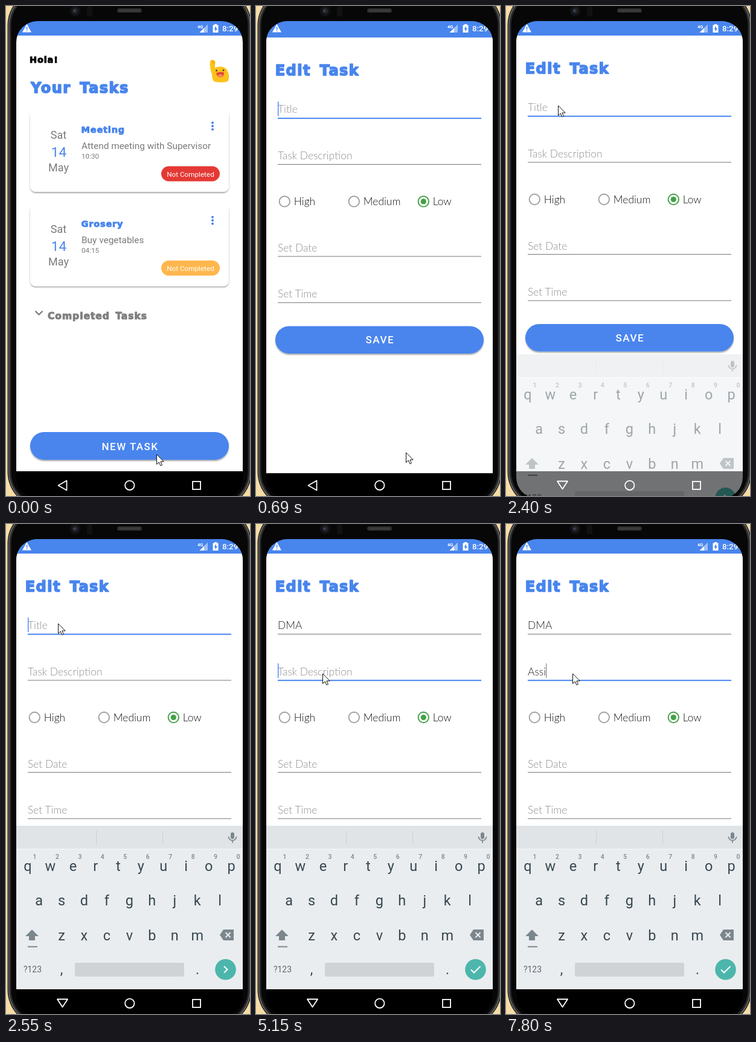
Write an HTML page that moves like this. It is 404x812 px and loops after 8 s.

```html
<!DOCTYPE html>
<html lang="en">
<head>
<meta charset="utf-8">
<title>Task app</title>
<style>
  html, body { margin: 0; width: 100%; height: 100%; overflow: hidden; background: #f6dca6; }
  svg { display: block; width: 404px; height: 812px; }
  text { font-family: Roboto, sans-serif; white-space: pre; }
  .fat { font-family: "DejaVu Sans", sans-serif; font-weight: 700; letter-spacing: .0625em; word-spacing: .2em;
    stroke-width: .07em; stroke-linejoin: round; }
  .form { font-family: Lato, sans-serif; font-weight: 300; font-size: 17.4px; }
</style>
</head>
<body>
<svg id="stage" viewBox="0 0 404 812" xmlns="http://www.w3.org/2000/svg"></svg>
<script>
const LOOP = 8000;
const BLUE = '#4885ed', GREY = '#7a7a7a', HINT = '#8e8e8e', INK = '#222';
const stage = document.getElementById('stage');

const rect = (x, y, w, h, fill, rx = 0, more = '') =>
  `<rect x="${x}" y="${y}" width="${w}" height="${h}" rx="${rx}" fill="${fill}" ${more}/>`;
const circle = (x, y, r, fill, more = '') =>
  `<circle cx="${x}" cy="${y}" r="${r}" fill="${fill}" ${more}/>`;
const path = (d, fill, more = '') => `<path d="${d}" fill="${fill}" ${more}/>`;
const line = (d, color, w, more = '') =>
  path(d, 'none', `stroke="${color}" stroke-width="${w}" ${more}`);
const label = (s, x, y, size, fill, more = '') =>
  `<text x="${x}" y="${y}" font-size="${size}" fill="${fill}" ${more}>${s}</text>`;
const mid = (s, x, y, size, fill, more = '') =>
  label(s, x, y, size, fill, `text-anchor="middle" ${more}`);
const fat = (s, x, y, size, fill) => label(s, x, y, size, fill, `class="fat" stroke="${fill}"`);
const form = (s, x, y, fill, more = '') =>
  `<text class="form" x="${x}" y="${y}" fill="${fill}" ${more}>${s}</text>`;

function phone() {
  const body = inset => {
    const l = 2.5 + inset, r = 406.5 - inset, k = 60 - inset;
    return `M${l} 32A${k} ${k} 0 0 1 ${l + k} ${32 - k}H${r - k}A${k} ${k} 0 0 1 ${r} 32` +
      `V772A${k} ${k} 0 0 1 ${r - k} ${772 + k}H${l + k}A${k} ${k} 0 0 1 ${l} 772Z`;
  };
  return path(body(0), '#222') + path(body(1.5), '#6a6a6a') + path(body(3), '#2a2a2a') + path(body(6), '#070707') +
    circle(114.5, 8, 9, '#121214') + circle(114.5, 8, 5, '#20242a') + circle(113.5, 8, 2, '#3d4654') +
    rect(134, 1, 9, 16, '#111', 2) + rect(184, 4, 41, 7, '#2f2f2f', 3.5) + rect(187, 6, 35, 3, '#3b3b3b', 1.5);
}

function card(y, title, note, time, color) {
  return `<g transform="translate(0 ${y})">` +
    rect(40, 0, 329, 136, '#fff', 9, 'filter="url(#shade)"') +
    mid('Sat', 87, 48, 18, GREY) + mid('14', 87.5, 77.5, 22.5, BLUE) + mid('May', 87, 102, 18, GREY) +
    fat(title, 124.5, 38, 14.4, BLUE) +
    label(note, 125, 64.5, 15.4, GREY) + label(time, 125, 81, 11.7, GREY) +
    [21.5, 27, 32.5].map(v => circle(342, v, 2, BLUE)).join('') +
    rect(257, 93.5, 97, 25, color, 12.5) + mid('Not Completed', 305.5, 110.5, 11.7, '#fff') + '</g>';
}

function emoji() {
  return path('M341 113C338 105 337 98 338 92Q340 87 344 90Q348 92 346 97L346 103C352 99 362 100 366 106' +
      'C370 113 370 121 367 125Q356 128 344 125Q341 120 341 113Z', '#fcc21b') +
    line('M341 90L342 95M345 91L344 96', '#e59600', 0.8) +
    circle(348.5, 107, 1.5, '#513f35') + circle(360, 106.5, 1.5, '#513f35') +
    path('M348 111Q354 108 361 110Q361 118 355 118.5Q349 118 348 111Z', '#e2453c') +
    path('M350 115Q355 111.5 359.5 115Q357 118.5 355 118.5Q352 118 350 115Z', '#f58a5b');
}

const bar = () => rect(17, 20, 375, 29, BLUE) + rect(17, 49, 375, 722, '#fff') + rect(17, 771, 375, 60, '#000');

function listPage() {
  return bar() + fat('Hola!', 39, 94, 14.4, '#000') + fat('Your Tasks', 41, 144, 24, BLUE) + emoji() +
    card(172, 'Meeting', 'Attend meeting with Supervisor', '10:30', '#e53935') +
    card(328.3, 'Grosery', 'Buy vegetables', '04:15', '#ffb74d') +
    line('M48.5 505.5L54.5 511.5L60.5 505.5', GREY, 2.2) +
    fat('Completed Tasks', 69, 518.5, 15.5, '#808080') +
    rect(40, 706, 329, 46, BLUE, 23, 'filter="url(#shade)"') +
    '<g clip-path="url(#pill)"><circle id="ripple" cx="249.5" cy="742" fill="#fff" opacity=".24"/></g>' +
    mid('NEW TASK', 205.5, 735.5, 17, '#fff', 'font-weight="500" letter-spacing="1.5"');
}

function radio(x, name, on) {
  const color = on ? '#43a047' : '#a0a0a0';
  return circle(x, 320.5, 8.7, 'none', `stroke="${color}" stroke-width="1.9"`) +
    (on ? circle(x, 320.5, 4.6, color) : '') + form(name, x + 15.5, 327, '#111');
}

function editPage() {
  const rule = (y, id = '') => `<rect ${id && `id="${id}"`} x="36" y="${y}" width="337" height="1" fill="#777"/>`;
  return bar() + fat('Edit Task', 31.7, 112, 24, BLUE) +
    '<text class="form" id="title" x="36" y="174"/>' + rule(182, 'titleRule') +
    '<text class="form" id="desc" x="36" y="250.5"/>' + rule(258.5, 'descRule') +
    rect(36, 155, 1.4, 24, BLUE, 0, 'id="caret"') +
    radio(47.3, 'High') + radio(162.3, 'Medium') + radio(277.3, 'Low', true) +
    form('Set Date', 36, 403.5, HINT) + rule(411) + form('Set Time', 36, 480, HINT) + rule(487.7) +
    rect(32, 527, 345, 45.5, BLUE, 22.7, 'filter="url(#shade)"') +
    mid('SAVE', 205.3, 556, 17, '#fff', 'font-weight="500" letter-spacing="1.5"');
}

function keyboard() {
  const key = '#37474f', soft = '#7b878d', step = 37.45;
  const row = (s, x, y) => [...s].map((c, i) => mid(c, x + i * step, y, 23.5, key)).join('');
  const digits = [...'1234567890'].map((c, i) =>
    mid(c, 47.5 + i * step, 554.5, 10.5, soft, 'font-weight="500"')).join('');
  return rect(17, 500, 375, 38, '#e1e4e7') + rect(17, 538, 375, 233, '#eaedf0') + rect(17, 538, 375, 1.5, '#f1f4f6') +
    rect(149, 508, 1, 23, '#cdd1d4') + rect(259, 508, 1, 23, '#cdd1d4') +
    rect(372, 511, 6, 11, soft, 3) + line('M368.5 518A6.5 6.5 0 0 0 381.5 518M375 524.5V528.5', soft, 1.7) +
    row('qwertyuiop', 36, 575) + digits + row('asdfghjkl', 54.6, 632) + row('zxcvbnm', 92, 689.5) +
    path('M43 672L54 683H48V690H38V683H32Z', soft) + rect(36, 699.5, 16, 2, soft) +
    path('M360 672H377V690H360L354 681Z', soft) + line('M363.5 677L371.5 685M371.5 677L363.5 685', '#eaedf0', 2) +
    label('?123', 29, 743, 13.9, '#5b686f') + mid(',', 92, 746, 23, key) + mid('.', 317, 746, 23, key) +
    rect(114, 727, 181, 23, '#cfd3d6', 3) + circle(363.5, 738.3, 17.3, '#4db6ac') +
    line('M361 733L366.5 738.3L361 743.6', '#fff', 2, 'id="next"') +
    line('M356 738.5L361 743.5L371.5 733', '#fff', 2, 'id="done"') + rect(17, 771, 375, 60, '#000');
}

function system() {
  return path('M34.5 30L42 43.5H27Z', '#fff') + rect(33.8, 34.5, 1.6, 4.5, BLUE) + rect(33.8, 40.2, 1.6, 1.6, BLUE) +
    label('4G', 317, 37, 7.5, '#fff', 'font-weight="700"') +
    path('M334 30.5V44H320.5Z', '#9fc0f6') + path('M328 36.5V44H320.5Z', '#fff') +
    path('M345 30H349V31.5H351.5V44H342.5V31.5H345Z', '#fff') + path('M348 33L344.5 38.5H346.5V42.5L350 37H348Z', BLUE) +
    label('8:29', 358, 42.3, 13.3, '#fff', 'font-weight="500"') +
    line('M100.5 786.5V802.5L86.5 794.5Z', '#fff', 1.8, 'id="back" stroke-linejoin="round"') +
    line('M85 787.5H102L93.5 800.5Z', '#fff', 1.8, 'id="down" stroke-linejoin="round"') +
    circle(204.8, 794.3, 7.7, 'none', 'stroke="#fff" stroke-width="1.8"') +
    rect(309, 788, 13, 13, 'none', 0, 'stroke="#fff" stroke-width="1.8"');
}

stage.innerHTML = `<defs>
  <filter id="shade" x="-5%" y="-20%" width="110%" height="150%">
    <feDropShadow dx="0" dy="2" stdDeviation="1.2" flood-opacity=".34"/></filter>
  <clipPath id="screen"><rect x="17" y="25" width="375" height="791" rx="35"/></clipPath>
  <clipPath id="pill"><rect x="40" y="706" width="329" height="46" rx="23"/></clipPath>
  <clipPath id="reveal"><rect id="revealBox" x="17" y="0" width="375" height="860"/></clipPath>
  </defs>${phone()}<g clip-path="url(#screen)"><g id="list">${listPage()}</g>
  <g id="edit"><g clip-path="url(#reveal)">${editPage()}</g></g>
  <g id="keys">${keyboard()}</g>${system()}</g>
  <g id="mouse">${path('M0 0V16.5L3.8 13L6.4 18.8L9 17.6L6.4 12H11.7Z', '#fff',
    'stroke="#111" stroke-width="1" stroke-linejoin="round"')}</g>`;

const el = {};
stage.querySelectorAll('[id]').forEach(n => el[n.id] = n);
const set = (n, o) => { for (const k in o) n.setAttribute(k, o[k]); };
const show = (n, on) => set(n, { visibility: on ? 'visible' : 'hidden' });
const clamp = v => Math.max(0, Math.min(1, v));

const ticks = [0, 140, 280, 420, 550, 690, 840, 990, 1140, 1260, 1400, 1530, 1660, 2100, 2400, 2550,
  3010, 3420, 3700, 4290, 4440, 4580, 4730, 4880, 5150, 5590, 6180, 6630, 6780, 7050, 7170, 7650, 7800];
const trail = [[0, 249.5, 743], [690, 248.5, 740], [840, 243, 700], [990, 199, 430], [1140, 149, 221],
  [1260, 122, 192], [1400, 102, 175], [1530, 90, 167], [1660, 86.5, 165], [4200, 86.5, 165],
  [4290, 88, 170], [4580, 103, 223], [4730, 109, 243], [4880, 110.5, 248], [LOOP, 110.5, 248]];
const titles = [[0, ''], [3010, 'D'], [3700, 'DMA']];
const notes = [[0, ''], [6630, 'A'], [7050, 'As'], [7170, 'Ass'], [7800, 'Assi']];
const caretOff = [[1140, 1660], [2100, 2550], [3420, 3700], [4290, 4730], [5590, 6180], [7650, 7800]];

const latest = (list, t) => list.filter(e => e[0] <= t).pop()[1];

function mouseAt(t) {
  const i = trail.findIndex(p => p[0] > t), [a, x, y] = trail[i - 1], [b, u, v] = trail[i];
  const k = (t - a) / (b - a);
  return `translate(${x + (u - x) * k} ${y + (v - y) * k})`;
}

function field(node, value, hint) {
  node.textContent = value || hint;
  set(node, { fill: value ? INK : HINT });
  return value ? 36 + node.getComputedTextLength() : 36;
}

function rule(node, y, on) {
  set(node, { y: on ? y - 0.3 : y, height: on ? 2 : 1, fill: on ? BLUE : '#777' });
}

function render(now) {
  const t = ticks.filter(v => v <= now).pop();
  const press = clamp((t - 60) / 360);
  set(el.ripple, { r: t < 140 ? 0 : 20 + 220 * press });

  const open = clamp((t - 420) / 405), left = (1 - open) ** 2;
  show(el.edit, t >= 420);
  set(el.edit, { transform: `translate(0 ${31 * left})` });
  set(el.revealBox, { y: 779 * (1 - open) ** 5 });
  set(el.list, { transform: `translate(0 ${t < 420 ? 0 : -15 * (1 - left)})` });

  const second = t >= 5150;
  const titleEnd = field(el.title, latest(titles, t), 'Title');
  const noteEnd = field(el.desc, latest(notes, t), 'Task Description');
  rule(el.titleRule, 182, !second);
  rule(el.descRule, 258.5, t >= 4880);
  set(el.caret, {
    x: second ? noteEnd : titleEnd, y: second ? 231 : 155,
    fill: t >= 7800 ? '#8e9299' : BLUE,
    opacity: t >= 550 && !caretOff.some(([a, b]) => t >= a && t < b) ? 1 : 0
  });

  const typing = t >= 2400, rise = clamp((t - 2330) / 145);
  show(el.keys, typing);
  set(el.keys, { opacity: rise, transform: `translate(0 ${149 * (1 - rise)})` });
  set(el.back, { opacity: typing ? 0 : 1 });
  set(el.down, { opacity: typing ? 1 : 0 });
  set(el.next, { opacity: second ? 0 : 1 });
  set(el.done, { opacity: second ? 1 : 0 });
  set(el.mouse, { transform: mouseAt(t) });
}

function frame() {
  render(performance.now() % LOOP);
  requestAnimationFrame(frame);
}
frame();
</script>
</body>
</html>
```
